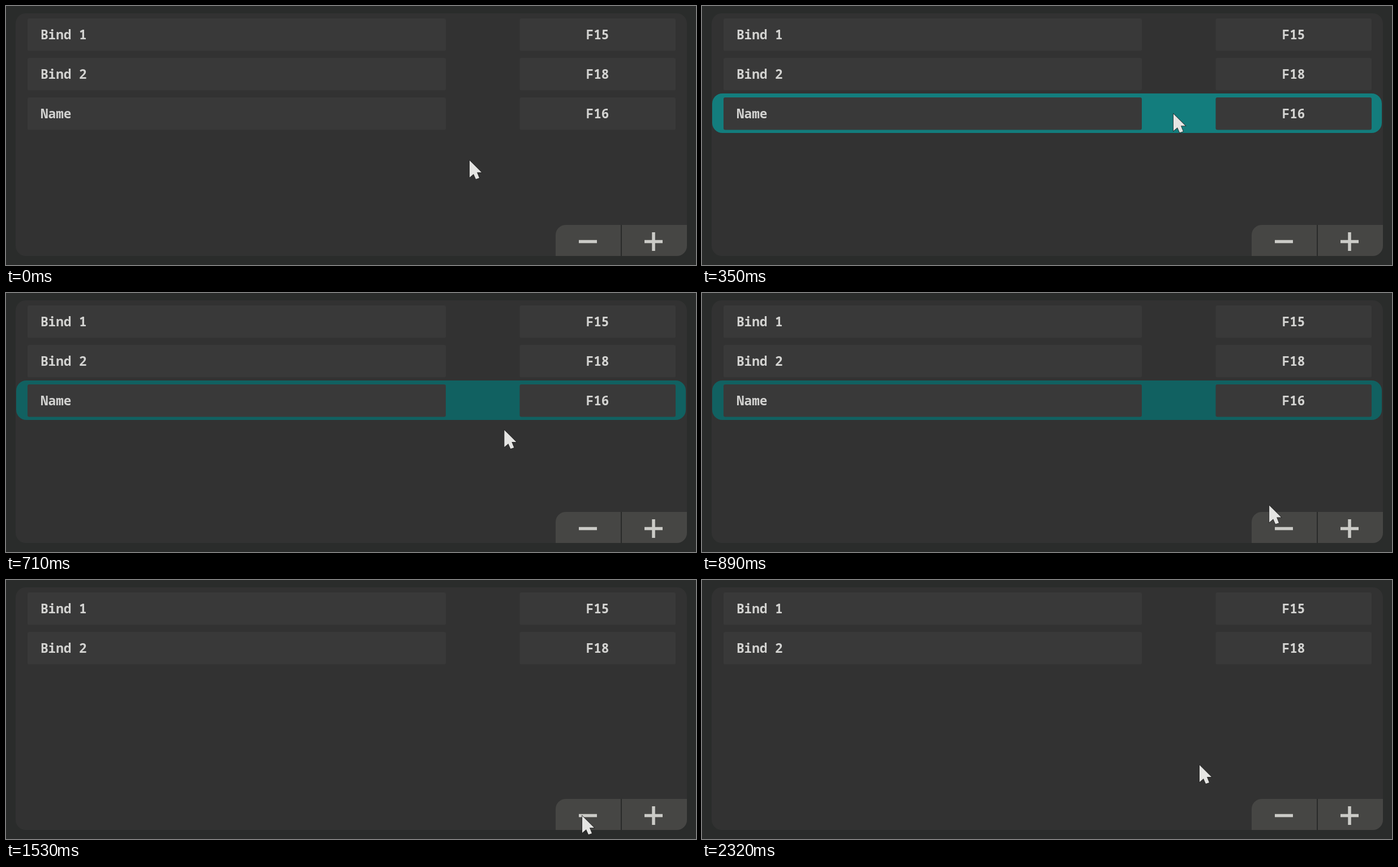
Animation of 1219 by 459 pixels, one loop 2390 ms. Source, as an HTML page:

```html
<!DOCTYPE html>
<html lang="en">
<head>
<meta charset="utf-8">
<title>Key binds</title>
<style>
  html, body { margin: 0; width: 100%; height: 100%; overflow: hidden; background: #2a2c2b; }
  svg { display: block; }
  text { font: 600 22.67px "Noto Sans Mono", "DejaVu Sans Mono", monospace; fill: #d3d3d1; }
  .field { fill: #393939; }
  .button { fill: #464644; }
  .sign { fill: none; stroke: #cbcbc7; stroke-width: 5.5; }
</style>
</head>
<body>
<svg width="1219" height="459" viewBox="0 0 1219 459">
  <rect x="17" y="13" width="1186" height="430" rx="18" fill="#323232"/>
  <rect id="highlight" x="18" y="155" width="1183" height="70" rx="18"/>
  <g id="rows"></g>
  <path id="minus" class="button" d="M971 443V406a18 18 0 0 1 18-18H1086V443Z"/>
  <path class="button" d="M1088 388H1203V425a18 18 0 0 1-18 18H1088Z"/>
  <path d="M1087 388V443" stroke="#292b2a" stroke-width="2"/>
  <path class="sign" d="M1012 417.5H1044M1128 417.5H1160M1144 401V434"/>
  <path id="cursor" d="M0 0V30L7 24L11 33L17 31L13 21H21Z" fill="#e5e5e3" stroke="#252525" stroke-width="1.5" paint-order="stroke"/>
</svg>
<script>
const LOOP = 2390, HOVER_ROW = 150, SELECT = 380, HOVER_MINUS = 915, REMOVE = 1480;
const el = id => document.getElementById(id);

el('rows').innerHTML = [['Bind 1', 'F15'], ['Bind 2', 'F18'], ['Name', 'F16']].map(([name, key], i) => `
  <g transform="translate(0 ${i * 70})">
    <rect class="field" x="38" y="22" width="739" height="57.5" rx="3"/>
    <rect class="field" x="907.5" y="22" width="275.5" height="57.5" rx="3"/>
    <text x="61" y="59">${name}</text>
    <text x="1045" y="59" text-anchor="middle">${key}</text>
  </g>`).join('');
const lastRow = el('rows').lastElementChild;

const linear = u => u;
const easeIn = u => u ** 1.4;
const easeOut = u => 1 - (1 - u) ** 2;
const easeInOut = u => u * u * (3 - 2 * u);

// Time, x, y and the easing used to arrive there
const path = [
  [0, 819, 274, linear],
  [170, 827, 226, linear],
  [370, 833, 191, easeOut],
  [590, 833, 191, linear],
  [890, 1002, 376, easeIn],
  [1100, 1018, 418, easeOut],
  [1590, 1018, 418, linear],
  [1720, 1020, 418, linear],
  [1930, 1020, 418, linear],
  [2320, 879, 328, easeInOut],
  [LOOP, 879, 328, linear]
];

function cursorAt(t) {
  const i = path.findIndex(p => p[0] > t);
  const [t0, x0, y0] = path[i - 1], [t1, x1, y1, ease] = path[i];
  const u = ease((t - t0) / (t1 - t0));
  return [x0 + (x1 - x0) * u, y0 + (y1 - y0) * u];
}

function draw(now) {
  const t = now % LOOP;
  const removed = t >= REMOVE;
  el('cursor').setAttribute('transform', `translate(${cursorAt(t)})`);
  el('highlight').style.fill = t < HOVER_ROW || removed ? 'none' : t < SELECT ? '#137d7d' : '#116161';
  lastRow.style.display = removed ? 'none' : '';
  el('minus').style.fill = t >= HOVER_MINUS && !removed ? '#555552' : '';
}

const start = performance.now();
function tick() {
  draw(performance.now() - start);
  requestAnimationFrame(tick);
}
tick();
</script>
</body>
</html>
```
